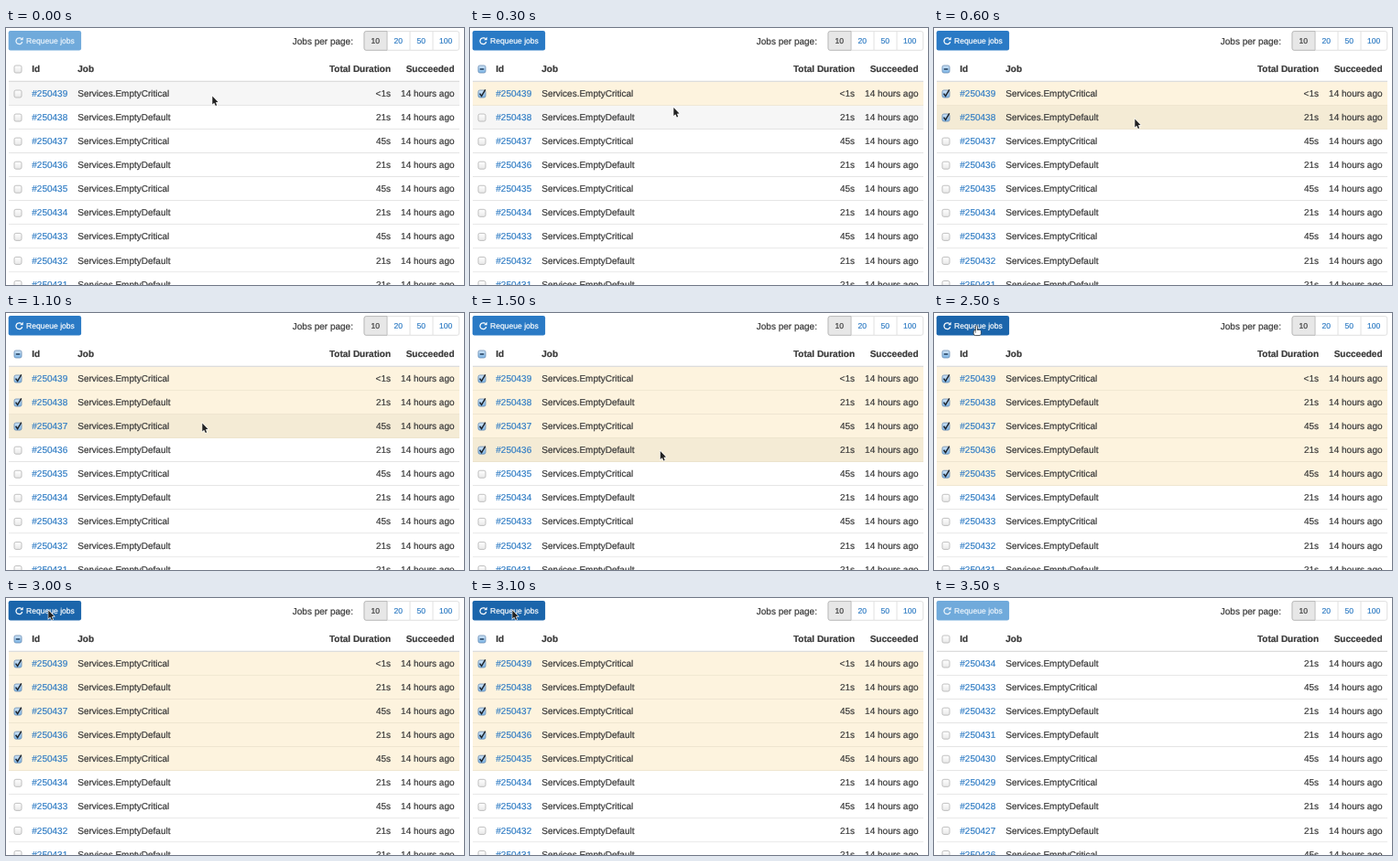
An HTML page with a canvas that plays this animation: 500x281 px, repeating every 3.6 s.

```html
<!DOCTYPE html>
<html lang="en">
<head>
<meta charset="utf-8">
<title>Succeeded jobs</title>
<style>
html, body { margin: 0; width: 100%; height: 100%; overflow: hidden; background: #fff; }
canvas { display: block; width: 500px; height: 281px; }
</style>
</head>
<body>
<canvas id="stage"></canvas>
<script>
const canvas = document.getElementById('stage');
const ctx = canvas.getContext('2d');
const dpr = window.devicePixelRatio || 1;
canvas.width = Math.round(500 * dpr);
canvas.height = Math.round(281 * dpr);

const LOOP = 3600, STEP = 100, RELOAD = 3200;
const TOP = 58.8, ROW = 26.06, LEFT = 3, WIDTH = 492;
const COL = { check: 13, id: 28.3, job: 78.3, duration: 420, done: 489.5 };
const SMALL = 8.57;
const FONT = '"Liberation Sans", Arial, Helvetica, sans-serif';
const INK = '#383838', LINK = '#2f7cc4';

// Job kinds from the newest id down: C = critical, D = default
const NEWEST = 439, KINDS = 'CDCDCDCDDCCDDC';

// Pointer stops: time, x, y
const path = [[0, 225, 74], [600, 219, 99], [1100, 214, 120], [1900, 201, 181], [2400, 46, 13]];

function pointerAt(t) {
  const i = path.findIndex(p => p[0] > t);
  if (i < 0) return path.at(-1).slice(1);
  const [t0, x0, y0] = path[i - 1], [t1, x1, y1] = path[i];
  const u = (t - t0) / (t1 - t0), e = u * u * (3 - 2 * u);
  return [x0 + (x1 - x0) * e, y0 + (y1 - y0) * e];
}

// One row is ticked every 375 ms, five in all
function checkedAt(t) {
  return t < RELOAD ? Math.max(0, Math.min(5, Math.floor((t - 200) / 375) + 1)) : 0;
}

function text(s, x, y, { color = INK, align = 'left', size = 10, weight = '' } = {}) {
  ctx.font = `${weight} ${size}px ${FONT}`;
  ctx.textAlign = align;
  ctx.textRendering = 'geometricPrecision';
  ctx.fillStyle = ctx.strokeStyle = color;
  ctx.lineWidth = 0.2;
  ctx.fillText(s, x, y);
  ctx.strokeText(s, x, y);
}

function rect(x, y, w, h, color) {
  ctx.fillStyle = color;
  ctx.fillRect(x, y, w, h);
}

function box(x, y, w, h, r, fill, stroke) {
  ctx.beginPath();
  ctx.roundRect(x, y, w, h, r);
  ctx.fillStyle = fill;
  ctx.fill();
  if (!stroke) return;
  ctx.strokeStyle = stroke;
  ctx.lineWidth = 0.8;
  ctx.stroke();
}

function trace(points) {
  ctx.beginPath();
  points.forEach(([x, y]) => ctx.lineTo(x, y));
}

function checkbox(y, state) {
  const x = COL.check;
  const g = ctx.createLinearGradient(0, y - 4, 0, y + 4);
  g.addColorStop(0, state ? '#d3e6f7' : '#fff');
  g.addColorStop(1, state ? '#7db5e6' : '#e8e8e8');
  box(x - 4, y - 4, 8, 8, 1.8, g, state ? '#6488b0' : '#b0b0b0');
  if (state === 'some') rect(x - 2.2, y - 0.8, 4.4, 1.6, '#2b4866');
  if (state === 'on') {
    trace([[x - 2.4, y - 0.4], [x - 0.4, y + 2.4], [x + 3.8, y - 4.6]]);
    ctx.strokeStyle = '#20262e';
    ctx.lineWidth = 1.5;
    ctx.stroke();
  }
}

function requeueButton(enabled, hover) {
  box(2.7, 3.1, 79.4, 21.4, 2.2, !enabled ? '#70aadb' : hover ? '#1b65ab' : '#2a7ac5');
  const color = enabled ? '#fff' : '#edf5fc';
  ctx.beginPath();
  ctx.arc(14.4, 14.2, 3.4, 0.25, Math.PI * 1.72);
  ctx.strokeStyle = color;
  ctx.lineWidth = 1.3;
  ctx.stroke();
  trace([[18.6, 9.8], [18.6, 13.2], [15.2, 13.2]]);
  ctx.fillStyle = color;
  ctx.fill();
  text('Requeue jobs', 22, 17.2, { color, size: SMALL });
}

function pager() {
  const left = 391, right = 494.7, cell = 25;
  text('Jobs per page:', 312.8, 17.6);
  box(left, 3.6, right - left, 20.7, 2.2, '#fff', '#d8d8d8');
  [10, 20, 50, 100].forEach((n, i) => {
    const x = left + i * cell, w = i < 3 ? cell : right - x;
    if (i) rect(x - 0.4, 4, 0.8, 20, '#dadada');
    else box(x, 3.6, w, 20.7, [2.2, 0, 0, 2.2], '#e7e7e7', '#b0b0b0');
    text(n, x + w / 2 - 0.3, 17.2, { color: i ? LINK : INK, align: 'center', size: SMALL });
  });
}

function header(some) {
  const y = 48.2, weight = 'bold';
  checkbox(45, some && 'some');
  text('Id', COL.id, y, { weight });
  text('Job', COL.job, y, { weight });
  text('Total Duration', COL.duration, y, { weight, align: 'right' });
  text('Succeeded', COL.done, y, { weight, align: 'right' });
  rect(LEFT, TOP - 1.1, WIDTH, 1.3, '#dcdcdc');
}

function row(i, id, checked, hover) {
  const y = TOP + i * ROW, base = y + 16.3;
  const critical = KINDS[NEWEST - id] === 'C';
  const fill = checked ? (hover ? '#f4ebd5' : '#fdf3de') : hover ? '#f6f6f6' : '#fff';
  rect(LEFT, y, WIDTH, ROW, fill);
  rect(LEFT, y + ROW - 0.8, WIDTH, 0.8, checked ? '#ebe1cb' : '#dcdcdc');
  checkbox(y + 13.2, checked && 'on');
  text('#250' + id, COL.id, base, { color: LINK });
  text('Services.Empty' + (critical ? 'Critical' : 'Default'), COL.job, base);
  text(id === NEWEST ? '<1s' : critical ? '45s' : '21s', COL.duration, base, { align: 'right' });
  text('14 hours ago', COL.done, base, { align: 'right' });
}

function arrow() {
  trace([[0.3, 0.6], [0.3, 9.6], [2.3, 7.8], [3.8, 11], [5.2, 10.4], [3.9, 7.3], [6.5, 7]]);
  ctx.closePath();
  ctx.strokeStyle = '#fff';
  ctx.lineWidth = 1.2;
  ctx.stroke();
  ctx.fillStyle = '#222';
  ctx.fill();
}

function hand() {
  box(-2.8, 5.6, 8, 6, 2.2, '#fff', '#333');
  box(-0.6, 0.8, 2, 8, 1, '#fff', '#333');
  rect(-0.2, 6, 5, 4.5, '#fff');
}

function draw(t) {
  const fresh = t >= RELOAD;
  const checked = checkedAt(t);
  const [px, py] = pointerAt(t);
  const onButton = px < 82 && py < 25;
  const hovered = fresh ? -1 : Math.floor((py - TOP) / ROW);
  const first = fresh ? NEWEST - 5 : NEWEST;

  ctx.setTransform(dpr, 0, 0, dpr, 0, 0);
  rect(0, 0, 500, 281, '#fff');
  requeueButton(checked > 0, onButton);
  pager();
  for (let i = 0; i < 9; i++) row(i, first - i, i < checked, i === hovered);
  header(checked > 0);

  if (fresh) return;
  ctx.translate(px, py);
  if (onButton && t < 2800) hand();
  else arrow();
}

const start = performance.now();
function tick() {
  const t = (performance.now() - start) % LOOP;
  draw(Math.floor(t / STEP) * STEP);
  requestAnimationFrame(tick);
}
tick();
</script>
</body>
</html>
```
